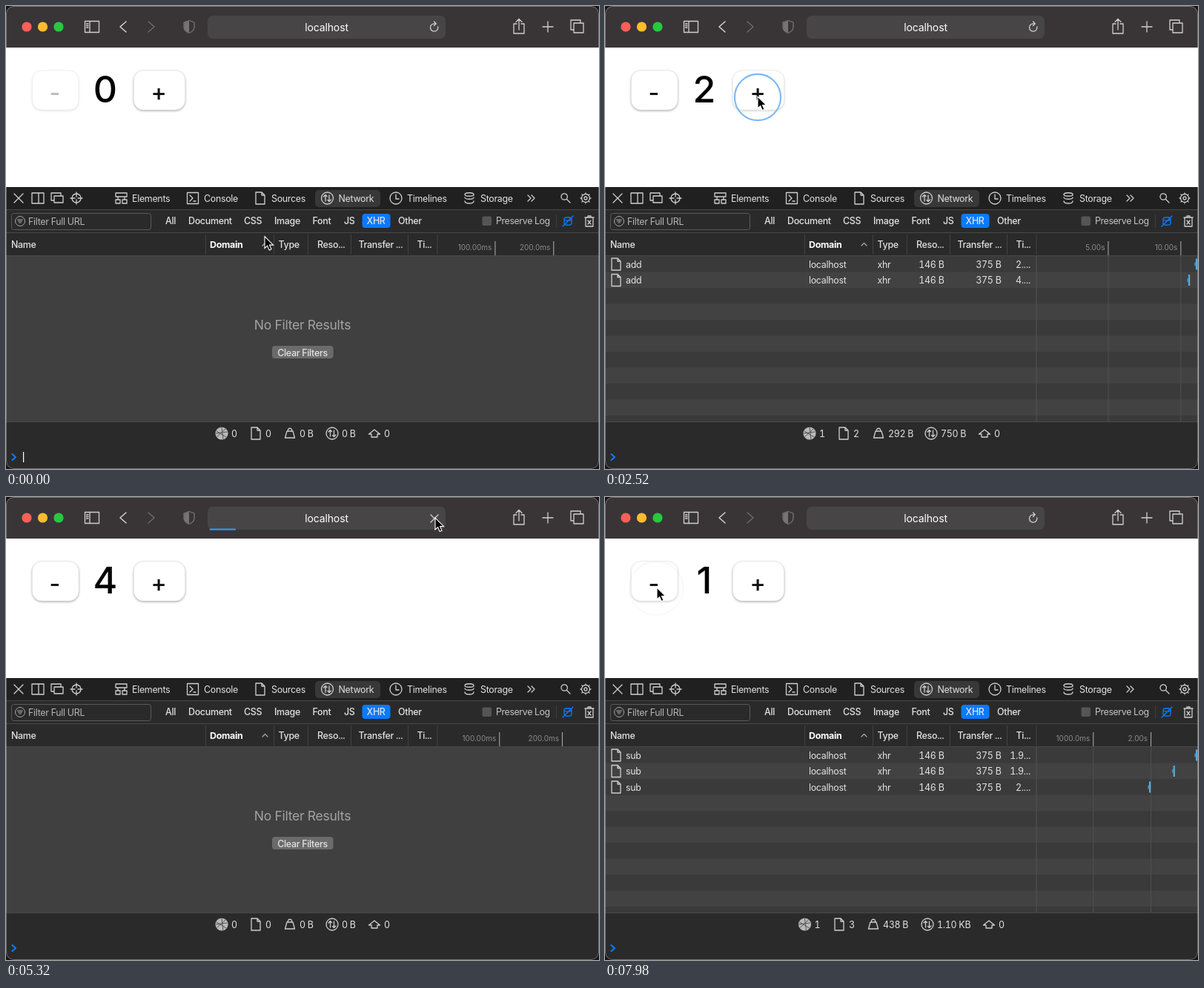
An HTML page that plays this animation: 800x624 px, repeating every 8 s.

```html
<!DOCTYPE html>
<html lang="en">
<head>
<meta charset="utf-8">
<title>localhost</title>
<style>
html, body { margin: 0; width: 100%; height: 100%; overflow: hidden; background: #1c1315; }
svg { display: block; width: 800px; height: 624px; }
text { font: 400 12.4px Inter, "Open Sans", sans-serif; font-variant-numeric: tabular-nums; letter-spacing: -.28px; fill: #e2e2e2; white-space: pre; }
text.med { font-weight: 500; }
text.bold { font-weight: 700; fill: #fff; }
text.tick { font-size: 10px; font-variant-numeric: normal; letter-spacing: 0; fill: #8b8b8b; }
text.big { font-size: 50px; font-weight: 450; font-variant-numeric: normal; letter-spacing: 0; fill: #000; }
text.sign { font-size: 32px; letter-spacing: 0; fill: #111; font-weight: 500; }
.ic { fill: none; stroke: #cfcfcf; stroke-width: 1.3; stroke-linecap: round; stroke-linejoin: round; }
.btn { fill: #fff; stroke: #e8e8e8; stroke-width: .6; }
</style>
</head>
<body>
<svg id="stage" viewBox="0 0 800 624"></svg>
<script>
const LOOP = 8000, STEP = 70, LAG = 110;
const ADDS = [1740, 2310, 2820, 3270], SUBS = [6785, 7235, 7660];
const RELOAD = 4880, CLEAR = 4970;
const ADD_ENDS = [10.57, 11.08, 11.62, 12.12], SUB_ENDS = [1.98, 2.4, 2.79];
const PLUS = [206, 123], MINUS = [69, 123], REFRESH = [578, 29];
const CLICKS = [...ADDS.map(t => [t, PLUS]), [RELOAD, REFRESH], ...SUBS.map(t => [t, MINUS])];
const LEFT = 581, SPAN = 217, ROW = 21.5, TOP = 337;
const BAR = "#2a2a2a", LINE = "#484848";

// time, x, y, easing towards this point
const PATH = [
  [0, 349, 310.5], [210, 349, 310.5], [1500, 206, 122, "both"], [3560, 206, 122],
  [4060, 415, 94.5, "in"], [4660, 579, 28, "out"], [5670, 579, 28], [6520, 70, 122, "both"], [LOOP, 70, 122]
];
const EASE = {
  in: u => u * u,
  out: u => 1 - (1 - u) ** 2,
  both: u => u * u * (3 - 2 * u)
};

const clamp = v => Math.max(0, Math.min(1, v));
const rect = (x, y, w, h, fill, extra = "") =>
  `<rect x="${x}" y="${y}" width="${w}" height="${h}" fill="${fill}" ${extra}/>`;
const text = (x, y, s, cls = "", extra = "") => `<text x="${x}" y="${y}" class="${cls}" ${extra}>${s}</text>`;
const icon = (x, y, d, extra = "") => `<path class="ic" transform="translate(${x} ${y})" d="${d}" ${extra}/>`;
const ring = r => `M${-r} 0a${r} ${r} 0 1 0 ${2 * r} 0a${r} ${r} 0 1 0 ${-2 * r} 0`;
const box = (x, y, w, h) => `M${x} ${y}h${w}v${h}h${-w}z`;
const END = 'text-anchor="end"', MID = 'text-anchor="middle"';

const PAGE = "M-6 -8H2L6 -4V8H-6ZM2 -8V-4H6";
const ARROWS = ring(8) + "M-2.5 4V-4.5M-5 -2L-2.5 -4.5L-.5 -2.5M2.5 -4V4.5M5 2L2.5 4.5L.5 2.5";
const CROSS = "M-5 -5L5 5M5 -5L-5 5";
const SPIN = "M4.8 -1A5.2 5.2 0 1 1 0 -5.2H2M-.5 -8L2.2 -5.2L-.5 -2.5";

function titleBar() {
  const lights = [["#fe5f57", 28], ["#febc2e", 49.5], ["#28c840", 71]]
    .map(([c, x]) => `<circle cx="${x}" cy="28" r="6.6" fill="${c}"/>`).join("");
  return rect(0, 0, 800, 56, "#393536") + lights
    + icon(116, 28, box(-9.5, -7.5, 19, 15) + "M-3 -7.5V7.5M-7.5 -4H-5M-7.5 -1.5H-5M-7.5 1H-5")
    + icon(158, 28, "M4 -7L-4 0L4 7", 'style="stroke-width:1.6"')
    + icon(196, 28, "M-4 -7L4 0L-4 7", 'style="stroke:#706c6d"')
    + icon(247, 28, "M0 -8.5L7 -6V0C7 4 4 7 0 8.5C-4 7 -7 4 -7 0V-6Z", 'style="stroke:#777374"')
    + '<path d="M247 20V36C243 34.5 240.5 32 240.5 28V22.5Z" fill="#777374"/>'
    + rect(272, 13, 321, 31, "#484546", 'rx="7"')
    + text(432.5, 34, "localhost", "", MID + ' style="font-size:14px;letter-spacing:-.12px;fill:#fff"')
    + icon(692, 28, "M-3 -4H-7V9H7V-4H3M0 4V-10M-4 -6.5L0 -10.5L4 -6.5")
    + icon(731, 28, "M-7 0H7M0 -7V7")
    + icon(770, 28, "M-5 4H-8V-9H5V-5" + box(-4, -5, 13, 13));
}

function tabBar() {
  const tabs = [[170, "Elements"], [267, "Console"], [358, "Sources"], [448.5, "Network"], [541, "Timelines"], [640, "Storage"]];
  const storage = "M-6 -5C-6 -8 6 -8 6 -5S-6 -2 -6 -5V-4.5M-6 -1C-6 2 6 2 6 -1M-6 4C-6 8 6 8 6 4M6 -5V-4";
  let teeth = "";
  for (let i = 0; i < 8; i++) {
    const c = Math.cos(i * Math.PI / 4), s = Math.sin(i * Math.PI / 4);
    teeth += `M${5.5 * c} ${5.5 * s}L${7 * c} ${7 * s}`;
  }
  return rect(0, 244, 800, 30, "#202020")
    + rect(417, 248, 88, 23, "#383838", 'rx="5"')
    + icon(17, 259, "M-6 -6L6 6M6 -6L-6 6")
    + icon(43, 259, box(-8, -7, 16, 14) + "M1 -7V7")
    + icon(69, 259, "M-4 3H-8V-7H5V-3" + box(-4, -3, 12, 9))
    + icon(95, 259, ring(6) + "M0 -8V-2M0 8V2M-8 0H-2M8 0H2")
    + icon(156, 259, box(-8, -7, 15, 5) + box(-8, 2, 6, 5) + box(1, 2, 6, 5) + "M-5 -2V2M4 -2V2")
    + icon(252, 259, box(-7.5, -7.5, 15, 15) + "M-4 -4L0 0L-4 4M1 4H4")
    + icon(343, 259, PAGE) + icon(433.5, 259, ARROWS)
    + icon(526, 259, ring(8) + "M0 -5V1H4") + icon(625, 259, storage)
    + tabs.map(([x, s]) => text(x, 264, s)).join("")
    + icon(708, 259, "M-4 -4L0 0L-4 4M1 -4L5 0L1 4")
    + icon(755, 259, "M-6 -2a4.2 4.2 0 1 0 8.4 0a4.2 4.2 0 1 0 -8.4 0M1.5 1.5L6 6")
    + icon(782, 259, ring(5.5) + ring(2) + teeth);
}

function filterBar() {
  const kinds = [[215, "All"], [246, "Document"], [321, "CSS"], [362, "Image"], [413.5, "Font"], [456, "JS"], [486.5, "XHR"], [529, "Other"]];
  return rect(0, 274, 800, 32, BAR) + rect(0, 274, 800, 1, LINE)
    + rect(7.5, 279.5, 188, 22, BAR, 'rx="3" stroke="#5a5a5a"')
    + icon(19, 290, ring(6.5) + "M-3.5 -2H3.5M-2.5 0H2.5M-1.2 2H1.2", 'style="stroke:#a8a8a8;stroke-width:1"')
    + text(30, 294.5, "Filter Full URL", "", 'style="fill:#b5b5b5"')
    + rect(480.5, 280, 38, 19, "#0a7aff", 'rx="4"')
    + kinds.map(([x, s]) => text(x, 294, s, "med")).join("")
    + rect(642.5, 283.5, 12.5, 12.5, "#555", 'rx="2"')
    + text(661, 294, "Preserve Log", "", 'style="letter-spacing:-.4px;fill:#c4c4c4"')
    + rect(742, 281, 1, 18, "#3c3c3c")
    + icon(758, 290, "M-5 -3C-5 -6 5 -6 5 -3V3C5 6 -5 6 -5 3ZM-5 -3C-5 0 5 0 5 -3M-7 7L7 -7", 'style="stroke:#0a7aff"')
    + icon(787, 290, "M-6 -5H6M-2 -5V-7H2V-5M-5 -5V7H5V-5M-2 -1L2 4M2 -1L-2 4");
}

function header() {
  const cols = [[7, "Name"], [367.5, "Type"], [420, "Reso..."], [475.5, "Transfer ..."], [554.5, "Ti..."]];
  return rect(0, 306, 800, 31, BAR) + rect(0, 305, 800, 1, LINE) + rect(0, 336, 800, 1, LINE)
    + cols.map(([x, s]) => text(x, 325.5, s, "med")).join("") + text(275, 325.5, "Domain", "bold")
    + [269, 361, 407, 465, 542, 581.5].map(x => rect(x, 308, 1, 27, "#424242")).join("")
    + icon(349.5, 321, "M-3.5 2L0 -1.5L3.5 2", 'style="stroke:#a5a5a5"');
}

function body(rows, name) {
  if (!rows) {
    return rect(0, TOP, 800, 224, "#404040")
      + text(400, 436, "No Filter Results", "", MID + ' style="font-size:17.5px;letter-spacing:-.25px;fill:#a3a3a3"')
      + rect(359, 458, 82.5, 17, "#6b6b6b", 'rx="4"')
      + text(400, 471.5, "Clear Filters", "med", MID);
  }
  let out = rect(0, TOP, 800, 224, "#3a3a3a");
  for (let i = 1; i < 11; i += 2) out += rect(0, TOP + i * ROW, 800, ROW, "#424242");
  out += rect(581.5, TOP, 1, 224, "#525252");
  for (let i = 0; i < rows; i++) {
    const y = 348 + i * ROW, first = i === rows - 1;
    const time = name === "add" ? (first ? "4...." : "2....") : first ? "2...." : "1.9...";
    out += icon(15, y, PAGE) + text(28, y + 4.5, name) + text(275, y + 4.5, "localhost")
      + text(367.5, y + 4.5, "xhr") + text(457.5, y + 4.5, "146 B", "", END)
      + text(534.5, y + 4.5, "375 B", "", END) + text(574, y + 4.5, time, "", END);
  }
  return out;
}

function ruler(end, ends) {
  const step = end < .5 ? .1 : end < 5 ? 1 : 5;
  let out = "";
  for (let k = 1; k * step < end; k++) {
    const v = k * step, x = LEFT + v / end * SPAN;
    const label = v >= 2 ? v.toFixed(2) + "s" : (v * 1000).toFixed(v === .1 ? 2 : 1) + "ms";
    out += text(x - 4.5, 328.5, label, "tick", END) + rect(x - .5, 317, 1, 19, "#b0b0b0");
    if (ends.length) out += rect(x - .5, TOP, 1, 224, "#505050");
  }
  ends.forEach((v, i) => {
    const x = LEFT + v / end * SPAN, y = 348 + (ends.length - 1 - i) * ROW;
    out += rect(x - 1, y - 7.5, 2.2, 15, "#5fa9d8") + rect(x - 2.8, y - 2.5, 2, 5, "#4784ad");
  });
  return out;
}

function footer(rows) {
  const size = n => n < 1024 ? n + " B" : (n / 1024).toFixed(2) + " KB";
  const xs = !rows ? [291, 337, 383, 440, 497] : rows < 3 ? [276, 322, 369, 440, 512] : [269.5, 316, 362, 435, 518];
  const labels = [rows ? 1 : 0, rows, size(rows * 146), size(rows * 375), 0];
  const shapes = [
    "M-7 -3L6 5M-6 4L5 -6M0 -8L2 8M-8 0L7 -2", PAGE, "M-4 -3H4L6.5 6H-6.5ZM-2.5 -3C-4 -8 4 -8 2.5 -3",
    ARROWS, "M-7.5 1L0 -5L7.5 1H4V5H-4V1Z"
  ];
  return rect(0, 561, 800, 31, BAR) + rect(0, 560, 800, 1, LINE)
    + `<circle cx="${xs[0]}" cy="576" r="8.6" fill="#b9b9b9"/>`
    + xs.map((x, i) => icon(x, 576, shapes[i], i ? "" : 'style="stroke:#555;stroke-width:1"')
      + text(x + 13, 580.5, labels[i])).join("");
}

function counter(value, pressed) {
  const button = (x, w, sign, spot, off) => {
    const shade = off ? .12 : pressed === spot ? .2 : .36;
    return rect(x, 87, w, 53, "#fff",
      `rx="13" class="btn" style="filter:drop-shadow(0 1px 1.4px rgba(0,0,0,${shade}))"`)
      + text(x + w / 2 - .8, 127.5, sign, "sign", MID + (off ? ' style="fill:#bdbdbd"' : ""));
  };
  return rect(0, 56, 800, 188, "#fff") + button(35.5, 62.5, "-", MINUS, !value)
    + text(133.8, 130, value, "big", MID) + button(172.5, 69, "+", PLUS, false);
}

function loading(t) {
  const busy = t >= 5040 && t < 5600;
  let out = icon(...REFRESH, busy ? CROSS : SPIN);
  if (t >= 5040 && t < 5880) {
    const p = .115 + .885 * clamp((t - 5340) / 260), fade = 1 - clamp((t - 5640) / 240);
    out += rect(274.5, 42.5, p * 318 - 1, 2.2, "#2f95f5", `rx="1" opacity="${fade}"`);
  }
  return out;
}

function pointer(t) {
  const i = Math.max(1, PATH.findIndex(p => p[0] > t));
  const [t0, x0, y0] = PATH[i - 1], [t1, x1, y1, ease] = PATH[i];
  const u = (EASE[ease] || (v => v))((t - t0) / (t1 - t0));
  return `<path transform="translate(${x0 + (x1 - x0) * u} ${y0 + (y1 - y0) * u})"
    d="M0 0V16L3.6 12.6L6.2 18.5L9 17.3L6.5 11.6H11.5Z" fill="#000" stroke="#fff" stroke-width="1.1"/>`;
}

function halo(click, t) {
  if (!click) return "";
  const [start, [x, y]] = click, age = t - start;
  return `<circle cx="${x}" cy="${y}" r="${21 + .048 * age}" fill="none" stroke="#7fb9f3"
    stroke-width="${3.4 - age * .006}" opacity="${clamp((330 - age) / 110)}"/>`;
}

const base = titleBar() + tabBar() + filterBar() + header()
  + rect(0, 591, 800, 33, BAR) + rect(0, 591, 800, 1, LINE)
  + icon(11, 608, "M-2.5 -4L2 0L-2.5 4", 'style="stroke:#0a7aff;stroke-width:2.2"');
const frame = `<rect x=".5" y=".5" width="799" height="623" rx="10" fill="none" stroke="#fff" stroke-opacity=".32"/>`;

const stage = document.getElementById("stage");
stage.innerHTML = `<clipPath id="win"><rect width="800" height="624" rx="10"/></clipPath>
  <g clip-path="url(#win)">${base}<g id="live"></g>${frame}</g><g id="over"></g>`;
const live = document.getElementById("live"), over = document.getElementById("over");

function draw(t) {
  const done = list => list.filter(c => t >= c + LAG).length;
  const adds = done(ADDS), subs = done(SUBS), cleared = t >= CLEAR;
  const rows = cleared ? subs : adds;
  const ends = (cleared ? SUB_ENDS : ADD_ENDS).slice(0, rows);
  const end = rows ? ends[rows - 1] : cleared ? .256 : .275;
  const click = CLICKS.find(([c]) => t >= c && t < c + 330);
  const caret = t < ADDS[0] && t % 1000 < 500 ? rect(23, 601, 1.2, 14, "#fff") : "";
  live.innerHTML = counter(adds - subs, click && click[1]) + body(rows, cleared ? "sub" : "add")
    + ruler(end, ends) + footer(rows) + loading(t) + caret;
  over.innerHTML = halo(click, t) + pointer(t);
}

let last = -1;
const origin = performance.now();
function tick() {
  const t = Math.floor((performance.now() - origin) % LOOP / STEP) * STEP;
  if (t !== last) draw(last = t);
  requestAnimationFrame(tick);
}
tick();
</script>
</body>
</html>
```
